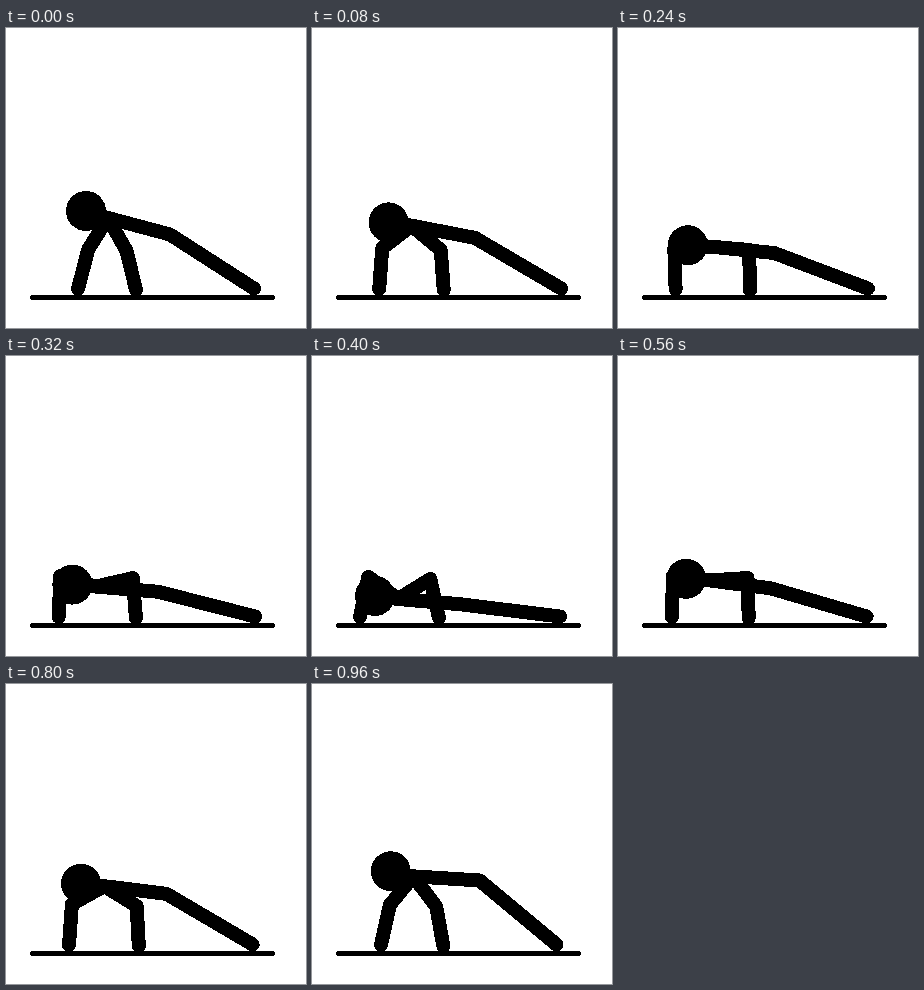
These frames come from a looping animation (300 by 300 pixels, 1040 ms). An HTML page:

```html
<!DOCTYPE html>
<html lang="en">
<head>
<meta charset="utf-8">
<title>Push-up</title>
<style>
  html, body { margin: 0; width: 100%; height: 100%; overflow: hidden; background: #fff; }
  svg { display: block; width: 100%; height: 100%; shape-rendering: crispEdges; }
  path { fill: none; stroke: #000; stroke-linecap: round; stroke-linejoin: round; }
</style>
</head>
<body>
<svg viewBox="0 0 300 300">
  <path d="M26.5 269.5H266.5" stroke-width="5"/>
  <path id="limbs" stroke-width="14"/>
  <circle id="head" r="20"/>
</svg>
<script>
const STEP = 80, STEPS = 13, DOWN = 5;
const LEG = 100;

const limbs = document.getElementById('limbs');
const head = document.getElementById('head');

const mix = (a, b, k) => a.map((v, i) => v + (b[i] - v) * k);
const line = (...pts) => 'M' + pts.map(p => p.join(' ')).join('L');

// Elbow of a two-bone arm; side is -1 to bend left, 1 to bend right.
function elbow(shoulder, hand, upper, fore, side) {
  const dx = hand[0] - shoulder[0], dy = hand[1] - shoulder[1];
  const dist = Math.hypot(dx, dy);
  const along = (upper ** 2 - fore ** 2 + dist ** 2) / (2 * dist);
  const out = side * Math.sqrt(Math.max(0, upper ** 2 - along ** 2));
  return [
    shoulder[0] + (dx * along + dy * out) / dist,
    shoulder[1] + (dy * along - dx * out) / dist
  ];
}

function draw(step) {
  const falling = step <= DOWN;
  const t = falling ? step / DOWN : (step - DOWN) / (STEPS - DOWN);
  const sink = falling ? t : 1 - t;
  const depth = falling ? t : sink ** 1.25;
  const sway = Math.sin(Math.PI * t);

  const skull = mix([80, 183], [63, 240], depth);
  const shoulder = mix([102, 190], [86, 243], depth ** 1.2);
  const handL = [72 - 24 * sink, 261];
  const handR = [130 - 3 * depth + 4 * sway, 262];
  const foot = [falling ? 248 + 2 * sway : 249 - 6 * t * t, 260.5];

  // The legs swing about the foot and overshoot on the way up.
  const degrees = falling ? 32.7 - 25.7 * t ** 1.5 : 7 + 37.5 * t;
  const angle = degrees * Math.PI / 180;
  const hip = [foot[0] - LEG * Math.cos(angle), foot[1] - LEG * Math.sin(angle)];

  head.setAttribute('cx', skull[0]);
  head.setAttribute('cy', skull[1]);
  limbs.setAttribute('d',
    line(shoulder, elbow(shoulder, handL, 37, 41, -1), handL) +
    line(shoulder, elbow(shoulder, handR, 38, 40, 1), handR) +
    line(skull, shoulder, hip, foot));
}

let shown = -1;
const start = performance.now();
function tick(now) {
  const step = Math.floor(Math.max(0, now - start) / STEP) % STEPS;
  if (step !== shown) draw(shown = step);
  requestAnimationFrame(tick);
}
tick(start);
</script>
</body>
</html>
```
